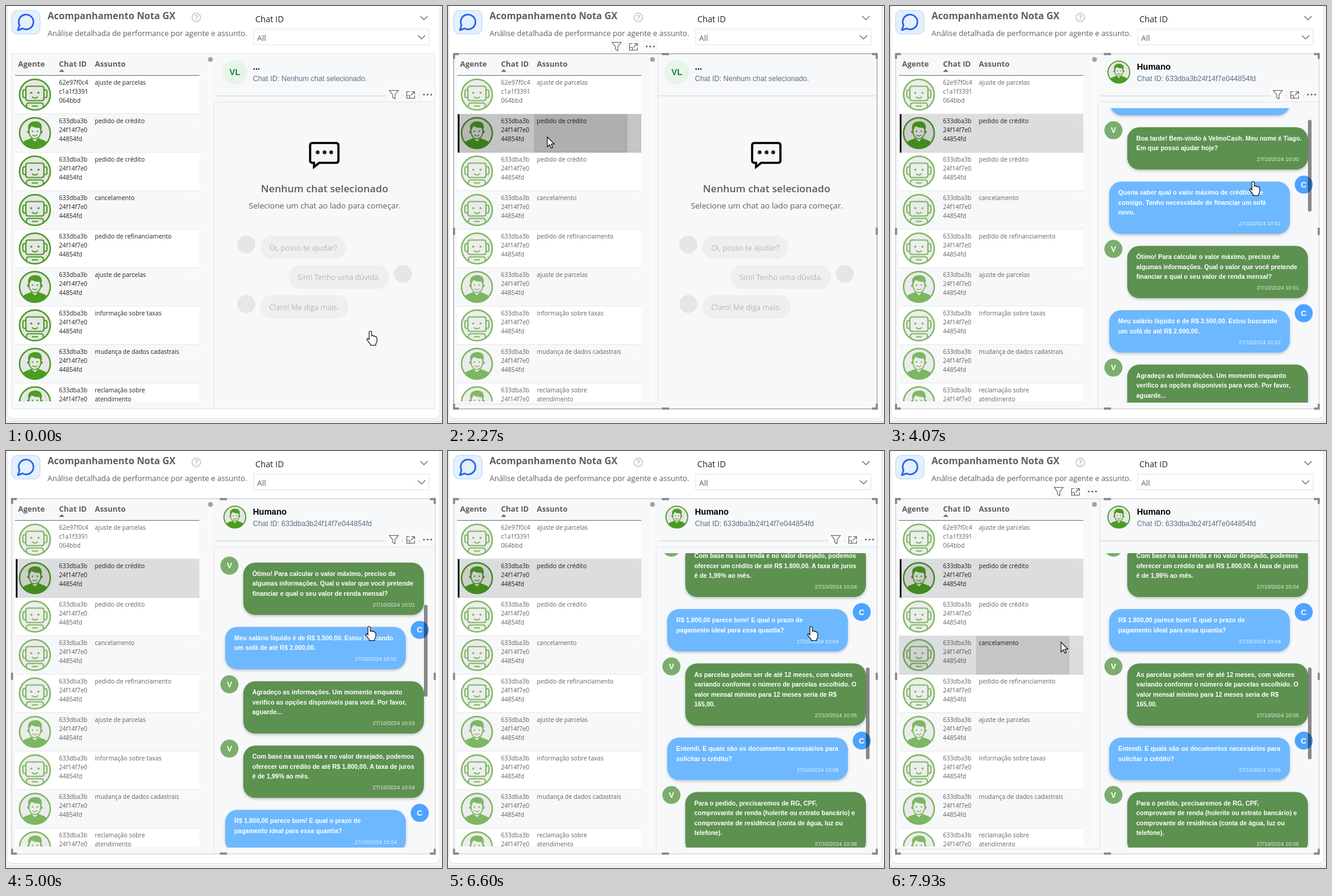
Recreate the animation shown at these times as an HTML page. Size 724 by 694 pixels, loop 8000 ms.

```html
<!DOCTYPE html>
<html lang="pt">
<head>
<meta charset="utf-8">
<style>
html, body { margin: 0; width: 100%; height: 100%; overflow: hidden; background: #f5f5f5; }
svg { display: block; width: 724px; height: 694px; font-family: "Open Sans", "Noto Sans", sans-serif; }
.arial { font-family: "Liberation Sans", Arial, sans-serif; }
.bubble { filter: drop-shadow(0 2px 2px rgba(0, 0, 0, .22)); }
</style>
</head>
<body>
<svg id="stage" viewBox="0 0 724 694"></svg>
<script>
const GREEN = '#4a9c22', GREY = '#605e5c', PANEL = '#f7f8fa';

const text = (x, y, s, size, fill, more = '') =>
  `<text x="${x}" y="${y}" font-size="${size}" fill="${fill}" ${more}>${s}</text>`;
const rect = (x, y, w, h, fill, more = '') =>
  `<rect x="${x}" y="${y}" width="${w}" height="${h}" fill="${fill}" ${more}/>`;
const circle = (x, y, r, fill, more = '') =>
  `<circle cx="${x}" cy="${y}" r="${r}" fill="${fill}" ${more}/>`;
const line = (d, stroke, width = 1, more = '') =>
  `<path d="${d}" fill="none" stroke="${stroke}" stroke-width="${width}" ${more}/>`;
const group = (id, body, more = '') => `<g id="${id}" ${more}>${body}</g>`;
const BOLD = 'font-weight="700"', SEMI = 'font-weight="600"', MID = 'text-anchor="middle"', END = 'text-anchor="end"';

// Agent portraits, centred on 0,0
const disc = circle(0, 0, 25.5, '#e6e6e6', `stroke="${GREEN}" stroke-width="2.5"`);
const human = disc +
  `<path d="M-20 16C-17 11-9 11-6 8L0 14L6 8C9 11 17 11 20 16A26 26 0 0 1-20 16Z" fill="${GREEN}"/>` +
  circle(-10.5, -2, 2.4, GREEN) + circle(10.5, -2, 2.4, GREEN) +
  `<ellipse cy="-2.5" rx="9.8" ry="12" fill="#e6e6e6" stroke="${GREEN}" stroke-width="1.6"/>
   <path d="M-10.5-4C-14-17-5-20 2-19.5C11-19 13-12 10.5-4L8.5-9C2-8-3-10-6-12C-8-10-9-7-9-4Z" fill="${GREEN}"/>` +
  circle(-4, -3, 1.3, GREEN) + circle(4, -3, 1.3, GREEN) + line('M-4 3Q0 6.5 4 3', GREEN, 1.5);
const robot = disc +
  line('M-11-14H11Q15-14 15-10V6Q15 10 11 10H-11Q-15 10-15 6V-10Q-15-14-11-14Z', GREEN, 2.2) +
  line('M-15-8H-17Q-20-8-20-5V2Q-20 5-17 5H-15M15-8H17Q20-8 20-5V2Q20 5 17 5H15', GREEN, 2) +
  line('M-14 21V18Q-14 14-10 14H10Q14 14 14 18V21M-5 19H5', GREEN, 2) +
  circle(-6, -3, 1.8, GREEN) + circle(6, -3, 1.8, GREEN) + line('M-5 3.5Q0 8 5 3.5', GREEN, 1.7);

// Table
const ID = ['633dba3b', '24f14f7e0', '44854fd'];
const rows = [
  [0, 'ajuste de parcelas', ''], [1, 'pedido de crédito', '5'], [0, 'pedido de crédito', ''],
  [0, 'cancelamento', '10'], [0, 'pedido de refinanciamento', ''], [1, 'ajuste de parcelas', '14'],
  [0, 'informação sobre taxas', ''], [1, 'mudança de dados cadastrais', '22'], [1, 'reclamação sobre|atendimento', '']];
const cellLines = (x, y, lines) => lines.map((s, k) => text(x, y + 15 * k, s, 10.1, '#252423')).join('');
const table = rows.map(([isHuman, subject, n], i) => {
  const y = 116 + 64 * i, id = i ? ID : ['62e97f0c4', 'c1a1f3391', '064bbd'];
  return rect(15, y, 306, 64, i % 2 ? PANEL : '#fff') + line(`M15 ${y + 63.5}H321`, '#e8e8e8') +
    `<g class="fade"><g transform="translate(48 ${y + 31.5})">${isHuman ? human : robot}</g>` +
    cellLines(88, y + 15, id) + '</g>' + text(317, y + 15, n, 10.1, '#fff', END) +
    `<g class="subject">${cellLines(147.5, y + 15, subject.split('|'))}</g>`;
}).join('');

// Conversation: sender, minute, lines
const talk = [
  ['C', 0, 'Olá, boa tarde! Gostaria de fazer um pedido de crédito.'],
  ['V', 0, 'Boa tarde! Bem-vindo à VelmoCash. Meu nome é Tiago.|Em que posso ajudar hoje?'],
  ['C', 1, 'Queria saber qual o valor máximo de crédito que|consigo. Tenho necessidade de financiar um sofá|novo.'],
  ['V', 1, 'Ótimo! Para calcular o valor máximo, preciso de|algumas informações. Qual o valor que você pretende|financiar e qual o seu valor de renda mensal?'],
  ['C', 2, 'Meu salário líquido é de R$ 3.500,00. Estou buscando|um sofá de até R$ 2.000,00.'],
  ['V', 3, 'Agradeço as informações. Um momento enquanto|verifico as opções disponíveis para você. Por favor,|aguarde...'],
  ['V', 4, 'Com base na sua renda e no valor desejado, podemos|oferecer um crédito de até R$ 1.800,00. A taxa de juros|é de 1,99% ao mês.'],
  ['C', 4, 'R$ 1.800,00 parece bom! E qual o prazo de|pagamento ideal para essa quantia?'],
  ['V', 5, 'As parcelas podem ser de até 12 meses, com valores|variando conforme o número de parcelas escolhido. O|valor mensal mínimo para 12 meses seria de R$|165,00.'],
  ['C', 6, 'Entendi. E quais são os documentos necessários para|solicitar o crédito?'],
  ['V', 6, 'Para o pedido, precisaremos de RG, CPF,|comprovante de renda (holerite ou extrato bancário) e|comprovante de residência (conta de água, luz ou|telefone).']];
let top_ = 180;
const messages = talk.map(([who, minute, body], i) => {
  const lines = body.split('|'), h = 37.5 + 16.5 * lines.length, y = top_, client = who === 'C';
  const x = client ? (i ? 364 : 365) : 394, right = client ? 664 : 694, ax = client ? 687 : 371;
  top_ += h + 20;
  return rect(x, y, right - x, h, client ? '#6db8ff' : '#5d9150', 'rx="20" class="bubble"') +
    lines.map((s, k) => text(x + 15, y + 22 + 16.5 * k, s, 10.4, '#fff', BOLD)).join('') +
    text(right - 15, y + h - 14, `27/10/2024 10:0${minute}`, 9, '#fff', END + ' opacity=".82"') +
    circle(ax, y + 5, 15, client ? '#4da3ff' : '#7bae6d') + text(ax, y + 9.5, who, 13, '#fff', BOLD + MID.padStart(22));
}).join('');

const pill = (x, y, w, h, s, cx) => circle(cx, y + 15, 15, '#e5e6e8') +
  rect(x, y, w, h, '#eeeff0', 'rx="19.5"') + text(x + 15, y + 25, s, 12.35, '#b5b6b8');
const empty =
  circle(380, 110, 20, '#e6f4ea') + text(380, 115, 'VL', 14, '#1b7f3b', BOLD + ' class="arial" ' + MID) +
  text(410, 106, '...', 14, '#000', BOLD + ' class="arial"') +
  text(410, 125, 'Chat ID: Nenhum chat selecionado.', 12, '#5b7083', 'class="arial"') +
  line('M509 228H548Q552 228 552 232V257Q552 261 548 261H520L511.500 268V261H509Q505 261 505 257V232Q505 228 509 228Z', '#000', 3.6) +
  [517.5, 529, 540].map(x => circle(x, 243.5, 3.2, '#222')).join('') +
  text(529, 309.5, 'Nenhum chat selecionado', 16.8, GREY, SEMI + ' ' + MID) +
  text(529.5, 337, 'Selecione um chat ao lado para começar.', 13.23, GREY, MID) +
  pill(422, 382, 143, 39, 'Oi, posso te ajudar?', 399) + pill(469, 431, 167, 40, 'Sim! Tenho uma dúvida.', 659) +
  pill(422, 481, 147, 39, 'Claro! Me diga mais.', 399);
const chat =
  `<g transform="translate(380 110) scale(.71)">${human}</g>` +
  text(410, 106, 'Humano', 14, '#000', BOLD) +
  text(410, 125, 'Chat ID: 633dba3b24f14f7e044854fd', 12, '#5b7083') +
  `<g clip-path="url(#chatClip)">${group('messages', messages)}` +
  rect(694, 173, 6, 153, 'rgba(0,0,0,.45)', 'rx="3" id="thumb"') + '</g>';

const toolbar = [268, 296, 324].map(x => rect(x, 55, 24, 24, '#f9fafb')).join('') +
  line('M272.500 60.500H287.500L282 67.500V74.500L278 72V67.500Z', GREY, 1.1) +
  line('M306 62.500H301.500V73.500H314.500V69M309 62.500H314.500V67M314.500 62.500L308.500 68.500M301.500 69H306.500V73.500', GREY, 1.1) +
  [330, 336, 342].map(x => circle(x, 67.5, 1.4, GREY)).join('');

const frame = line('M9.500 79.500H712.500V670.500H9.500Z', '#8c8c8c', 1, 'id="edge"') +
  line('M10 88V80H18M704 80H712V88M712 662V670H704M18 670H10V662M355 80H367M355 670H367M10 369V381M712 369V381', '#868686', 3.4);

document.getElementById('stage').innerHTML =
  `<clipPath id="tableClip"><path d="M10 80H345V658H10Z"/></clipPath>
   <clipPath id="chatClip"><path d="M350 170H704V660H350Z"/></clipPath>` +
  rect(1.5, -12, 719, 698.5, '#fff', 'rx="9" stroke="#dedede"') + line('M0 691.500H724', '#d8d8d8') +
  rect(9.5, 7.5, 47, 39, '#e4f0fe', 'rx="9" stroke="#b8d3f5"') +
  line('M7.900 20A9 9 0 1 0 4 16.100L2 22Z', '#2563eb', 2, 'transform="translate(17 10.2) scale(1.36)" stroke-linejoin="round"') +
  text(69, 22, 'Acompanhamento Nota GX', 15.6, GREY, BOLD) +
  text(69, 50, 'Análise detalhada de performance por agente e assunto.', 12.56, GREY) +
  circle(316, 19, 7, 'none', 'stroke="#c4c2c0" stroke-width="1.5"') + text(316, 23, '?', 11, '#b8b6b4', BOLD + ' ' + MID) +
  text(414, 27, 'Chat ID', 13.8, '#252423') + line('M688 17L694 23L700 17', GREY, 1.2) +
  rect(411.5, 38.5, 291, 26, '#fff', 'stroke="#e3e3e3"') + text(417, 58, 'All', 12.9, GREY) +
  line('M684 49L690 55L696 49', GREY, 1.2) +
  rect(9.5, 79.5, 703, 591, PANEL, 'stroke="#e4e5e7"') +
  text(20, 101, 'Agente', 12.6, GREY, BOLD) + text(88, 101, 'Chat ID', 12.6, GREY, BOLD) +
  text(147.5, 101, 'Assunto', 12.6, GREY, BOLD) + `<path d="M88 109.500L92.500 105.500L97 109.500Z" fill="${GREY}"/>` +
  rect(335, 84, 9, 574, '#fafafb') + circle(339.5, 89, 4, '#a3a3a3') +
  '<g clip-path="url(#tableClip)">' + table +
  group('chosen', rect(15, 180, 306, 64, 'rgba(0,0,0,.11)') + rect(16.5, 180, 2.5, 64, '#000')) +
  group('hover', rect(15, 0, 306, 64, 'rgba(0,0,0,.11)') + rect(0, 0, 0, 64, 'rgba(0,0,0,.11)', 'id="cell"')) + '</g>' +
  line('M15 115.500H321', '#6e6e6e') + line('M349 149.500H712', '#dcdfe3', 1.5) +
  group('empty', empty) + group('chat', chat, 'class="arial"') +
  line('M10 662.500H348.500V80', '#e4e5e7', 1, 'id="tableEdge"') + line('M345.500 670V159.500H712', '#e4e5e7', 1, 'id="chatEdge"') +
  group('frame', frame) + group('toolbar', toolbar) +
  group('cursor',
    '<path id="arrow" d="M0 0V16.500L3.900 12.800L6.300 18.400L8.800 17.300L6.400 11.800H11.500Z"/>' +
    '<path id="hand" d="M-2 2Q-2 0 0 0T2 2V8Q4 6.500 5.500 8.500Q7.500 7.500 8.500 9.500Q11 9 11 12V16Q11 19 9 21V23.500H0V21.500L-5.500 14.500Q-6 12-3.500 12.500L-2 14Z"/>',
    'fill="#fff" stroke="#000" stroke-width="1.1"');

// Time keys: [ms, values...]
const pointer = [[60, 605, 541], [730, 165, 218], [2590, 165, 218], [3470, 598, 212], [3720, 598, 212],
  [3930, 603, 292], [7670, 603, 292], [7930, 284, 318]];
const scroll = [[3930, 0], [4200, 100], [4460, 100], [4730, 200], [4840, 200], [5330, 400], [6185, 400],
  [6600, 600], [6720, 600], [6930, 500], [7450, 500], [7670, 600]];
const smooth = p => p * p * (3 - 2 * p);
function at(keys, t, ease = p => p) {
  const i = keys.findIndex(k => k[0] > t);
  if (i < 1) return (i ? keys[keys.length - 1] : keys[0]).slice(1);
  const a = keys[i - 1], b = keys[i], p = ease((t - a[0]) / (b[0] - a[0]));
  return a.slice(1).map((v, k) => v + (b[k + 1] - v) * p);
}

const $ = id => document.getElementById(id);
const show = (id, on) => $(id).setAttribute('display', on ? 'inline' : 'none');
const move = (id, x, y) => $(id).setAttribute('transform', `translate(${x} ${y})`);
const fades = document.querySelectorAll('.fade'), subjects = document.querySelectorAll('.subject');
const columns = [15, 84, 143, 298, 321];

function draw(t) {
  const [x, y] = at(pointer, t, smooth).map(Math.round), [s] = at(scroll, t);
  const picked = t >= 2270, loaded = t >= 2930, inTable = x < 346;
  const row = x < 321 && y >= 116 && y < 658 ? Math.floor((y - 116) / 64) : -1;
  const col = columns.findIndex(c => c > x) - 1;

  show('chosen', picked);
  show('frame', picked);
  show('empty', !loaded);
  show('chat', loaded);
  show('hover', row >= 0);
  show('tableEdge', inTable);
  show('chatEdge', !inTable);
  show('arrow', inTable);
  show('hand', !inTable);
  $('edge').setAttribute('stroke', loaded ? '#c8c8c8' : '#8c8c8c');

  if (row >= 0) {
    move('hover', 0, 116 + 64 * row);
    $('cell').setAttribute('x', columns[col]);
    $('cell').setAttribute('width', columns[col + 1] - columns[col]);
  }
  fades.forEach((g, i) => g.setAttribute('opacity', picked && i !== 1 ? .7 : 1));
  subjects.forEach((g, i) => g.setAttribute('opacity', picked && i !== 1 && !(i === row && col === 2) ? .7 : 1));

  move('messages', 0, -s);
  move('thumb', 0, s * .312);
  move('toolbar', inTable ? 0 : 364, inTable ? 0 : 80);
  move('cursor', x, y);
}

const start = performance.now();
function tick() {
  draw((performance.now() - start) % 8000);
  requestAnimationFrame(tick);
}
tick();
</script>
</body>
</html>
```
